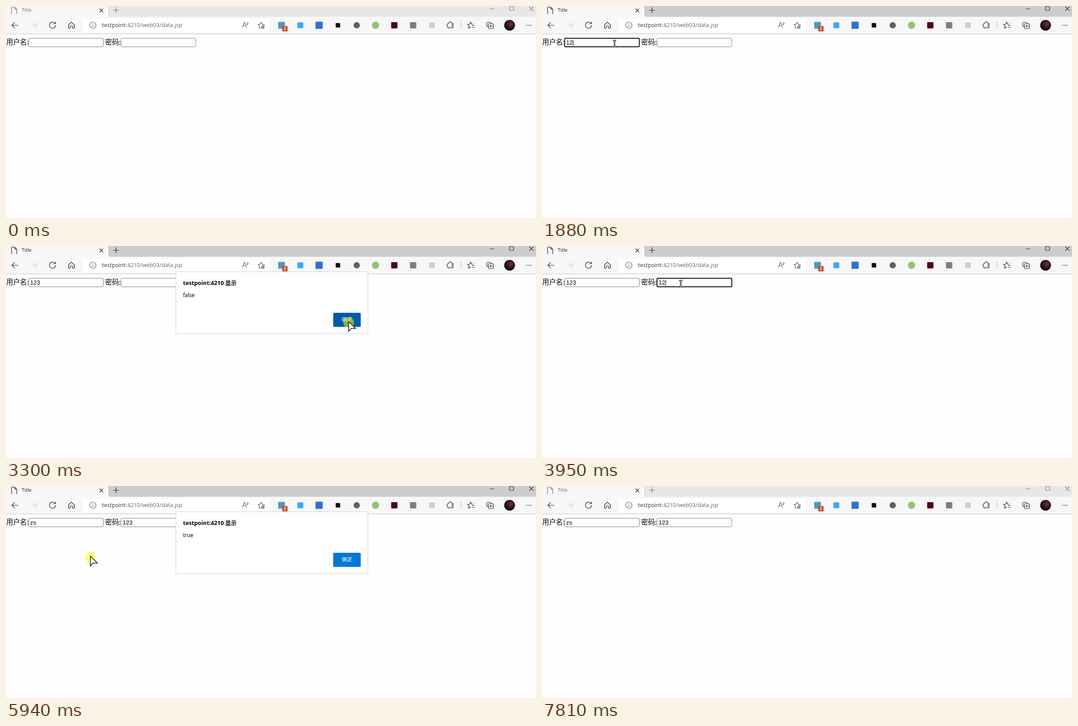
An HTML page that plays this animation: 1184x473 px, repeating every 7.88 s.

```html
<!DOCTYPE html>
<html lang="zh">
<head>
<meta charset="utf-8">
<title>Login form</title>
<style>
html, body { margin: 0; width: 100%; height: 100%; overflow: hidden; background: #fefefe; }
svg { display: block; }
text { font-family: "Noto Sans", "Noto Sans CJK SC", sans-serif; }
.cjk { font: 15.4px "Noto Sans CJK SC", sans-serif; }
.field { font: 13.33px "Liberation Sans", sans-serif; }
.line { fill: none; stroke: currentColor; stroke-width: 1.2; }
</style>
</head>
<body>
<svg width="1184" height="473" viewBox="0 0 1184 473">
  <rect width="1184" height="473" fill="#fefefe"/>
  <rect id="bar" width="1184" height="24"/>
  <path d="M0 0H229V20q0 4 4 4H0z" fill="#f7f7f7"/>
  <path d="M229.5 0V20q0 4 4 4" fill="none" stroke="#bbb" stroke-width=".7"/>
  <g id="title">
    <path class="line" d="M14.5 16.5H12.5V2.5H19.5L24 7V16.5H22M19.5 2.5V7H24"/>
    <text x="35" y="13" font-size="11" fill="currentColor">Title</text>
    <path class="line" d="M239 9.5H252M245.5 3V16"/>
    <path class="line" stroke-width="1" d="M1081 6.5H1091M1126 1.5h7q1 0 1 1v6q0 1-1 1h-7q-1 0-1-1v-6q0-1 1-1zM1169 1.5l9 9m0-9l-9 9"/>
  </g>
  <path class="line" color="#222" d="M209 6l8 8m0-8l-8 8"/>

  <rect y="24" width="1184" height="38" fill="#f7f7f7"/>
  <path d="M0 62.5H1184" stroke="#c4c4c4"/>
  <rect x="172" y="28" width="417" height="30" rx="4" fill="#fff"/>
  <g class="line" color="#222">
    <path d="M27.5 43H13.5M19.5 36.5L13 43l6.500 6.500"/>
    <path color="#ccc" stroke="#ccc" d="M54.500 43H68.500M62.500 36.500L69 43l-6.500 6.500"/>
    <path d="M109.500 38.500A7 7 0 1 0 111 43M110.500 35V39.500H106"/>
    <path d="M139.500 42L146 36l6.500 6V49.500H148.500V45q0-1-1-1h-3q-1 0-1 1V49.500H139.500z"/>
    <g stroke="#666">
      <circle cx="194" cy="43" r="7"/>
      <path d="M194 42V47M194 39V40.500"/>
      <path d="M528 48L532.500 36.500L537 48M529.500 44H535.500M537 38q2 2 0 4M539 36q3.500 3.500 0 7"/>
      <path d="M570 36l2.200 4.600 5 .7-3.600 3.500.9 5-4.500-2.300-4.500 2.300.9-5-3.600-3.500 5-.7z"/>
    </g>
    <circle cx="574" cy="47" r="4" fill="#555" stroke="#fff"/>
    <path stroke="#fff" d="M572 47H576M574 45V49"/>
    <path d="M988 38h3q-1-3 2-3t2 3h3q1 0 1 1v2.500q-3-1-3 1.500t3 1.500V48q0 1-1 1h-3q0-2-2-2t-2 2h-3q-1 0-1-1v-3q-2 0-2-2t2-2v-2q0-1 1-1z"/>
    <path d="M1044 40.500h-4l-2-4.500-2 4.500-5 .6 3.600 3.400-1 5 4.400-2.400M1041 43.500H1047M1041 47.500H1047"/>
    <path d="M1077 45.500h-1q-2 0-2-2v-5q0-2 2-2h6q2 0 2 2"/>
    <rect x="1077.500" y="39.500" width="11" height="10.500" rx="2"/>
    <path d="M1083 42V47.500M1080.200 44.800H1085.800"/>
    <path stroke="#bbb" d="M1016.500 35V50"/>
  </g>
  <path d="M1163.500 43h.1M1168.500 43h.1M1173.500 43h.1" stroke="#222" stroke-width="2.200" stroke-linecap="round"/>
  <text x="214.500" y="47" font-size="12.500" fill="#444">testpoint<tspan fill="#707070">:4210/web03/data.jsp</tspan></text>

  <g id="tools"></g>
  <rect x="617" y="44.500" width="12" height="12" rx="2" fill="#c8472b"/>
  <text x="623" y="54.300" font-size="10" text-anchor="middle" fill="#fff">8</text>
  <radialGradient id="photo" cx=".6" cy=".4" r=".5">
    <stop stop-color="#7d2c2c"/><stop offset="1" stop-color="#120e12"/>
  </radialGradient>
  <circle cx="1125" cy="43" r="12" fill="url(#photo)"/>

  <text class="cjk" x="0.500" y="86">用户名:</text>
  <text class="cjk" x="221.500" y="86">密码:</text>
  <g id="fields"></g>

  <g id="dialog">
    <rect x="379.500" y="57.500" width="429" height="138" fill="#fff" stroke="#cfcfcf"/>
    <text x="395.500" y="87" font-size="12.700" font-weight="700">testpoint:4210 显示</text>
    <text id="answer" x="395.500" y="114" font-size="11.700"></text>
    <rect id="ok" x="731" y="149" width="61.500" height="31.500" rx="2"/>
    <text x="761.700" y="168.300" font-size="11.700" font-weight="500" text-anchor="middle" fill="#fff">确定</text>
  </g>

  <g id="pointer">
    <circle id="press" cx=".5" cy="3" r="12" fill="#ff0" fill-opacity=".5"/>
    <path id="arrow" d="M.5 .5V22.500L6 16H16z" fill="#fff" stroke="#111" stroke-width="1.500"/>
    <g id="beam" fill="none">
      <path d="M-3.500-7H3.500M0-7V7M-3.500 7H3.500" stroke="#222" stroke-width="3.200"/>
      <path d="M-2.500-7H2.500M0-7V7M-2.500 7H2.500" stroke="#ddd" stroke-width="1"/>
    </g>
  </g>
</svg>
<script>
const LOOP = 7880;
const $ = id => document.getElementById(id);

function add(parent, tag, attrs) {
  const node = document.createElementNS("http://www.w3.org/2000/svg", tag);
  for (const key in attrs) node.setAttribute(key, attrs[key]);
  return parent.appendChild(node);
}

// Toolbar buttons: size, colour, round
[[15, "#4f97bd"], [13, "#3fa7f0"], [16, "#2b72cf"], [10, "#111"], [14, "#526473", 1],
 [16, "#94c074", 1], [14, "#4d0d12"], [14, "#7b7e7b"], [13, "#cfcfcf"]].forEach(([size, fill, round], i) =>
  add($("tools"), "rect", { x: 615.5 + i * 42 - size / 2, y: 43 - size / 2,
    width: size, height: size, rx: round ? size / 2 : 1, fill }));

const fields = [50.5, 257].map(x => ({
  x,
  box: add($("fields"), "rect", { x, y: 72, width: 167, height: 19, rx: 2, fill: "#fff" }),
  text: add($("fields"), "text", { class: "field", x: x + 3.5, y: 86 }),
  caret: add($("fields"), "path", { stroke: "#000" })
}));

// Time, x, y
const path = [
  [30, 1082, 458], [400, 560, 230], [770, 162, 84], [2070, 162, 84], [2380, 342, 97],
  [2720, 342, 97], [2850, 306, 112], [3200, 765, 168], [3370, 765, 168], [3490, 408, 150],
  [3700, 310, 84], [4080, 310, 84], [4200, 241, 152], [4350, 241, 152], [4590, 148, 91],
  [4650, 132, 83], [5670, 132, 83], [5850, 188, 156], [6040, 188, 156], [6250, 430, 190],
  [6440, 650, 182], [6650, 762, 168], [6900, 762, 168], [7240, 848, 251], [7390, 1112, 466]
];
const presses = [[1250, 1340], [2380, 2470], [3270, 3370], [3700, 3790],
  [4170, 4240], [4640, 4680], [5870, 6040], [6760, 6870]];
const focusSpans = [[[1250, 2400], [4650, 5890]], [[3710, 4190]]];
const typing = [
  [[0, ""], [1600, "1"], [1780, "12"], [1940, "123"], [4870, "12"], [4970, "1"], [5070, ""], [5350, "z"], [5500, "zs"]],
  [[0, ""], [3850, "1"], [3940, "12"], [4030, "123"]]
];
const alerts = [[2440, 3370], [5910, 6870]];

const within = (t, spans) => spans.some(([from, to]) => t >= from && t < to);
const latest = (t, steps) => steps.filter(step => step[0] <= t).pop()[1];
const show = (node, on) => node.setAttribute("visibility", on ? "inherit" : "hidden");

function position(t) {
  const i = path.findIndex(point => point[0] > t);
  if (i < 0) return path[path.length - 1].slice(1);
  if (i === 0) return path[0].slice(1);
  const [t0, x0, y0] = path[i - 1], [t1, x1, y1] = path[i];
  const p = (t - t0) / (t1 - t0), e = p + p * (1 - p) * (p - .5);
  return [x0 + (x1 - x0) * e, y0 + (y1 - y0) * e];
}

function draw(t) {
  const [x, y] = position(t);
  const active = t >= 1250 && t < 7810;
  const alerting = within(t, alerts);
  const pressed = within(t, presses);
  let overField = false;

  $("bar").setAttribute("fill", active ? "#cdcdcd" : "#e7e7e7");
  $("title").setAttribute("color", active ? "#222" : "#777");

  fields.forEach((field, i) => {
    const hover = !alerting && t >= 30 && x > field.x && x < field.x + 167 && y > 72 && y < 91;
    const focus = within(t, focusSpans[i]);
    overField = overField || hover;
    field.box.setAttribute("stroke", focus ? "#101010" : hover ? "#333" : "#767676");
    field.box.setAttribute("stroke-width", focus ? 2 : 1);
    field.text.textContent = latest(t, typing[i]);
    const end = Math.round(field.x + 4 + field.text.getComputedTextLength()) + .5;
    field.caret.setAttribute("d", `M${end} 75V89`);
    show(field.caret, focus);
  });

  show($("dialog"), alerting);
  $("answer").textContent = t < 5000 ? "false" : "true";
  const overOk = x > 731 && x < 792 && y > 149 && y < 180;
  $("ok").setAttribute("fill", overOk ? pressed ? "#005ca8" : "#006cc1" : "#0078d7");

  show($("pointer"), t >= 30 && t < 7390);
  $("pointer").setAttribute("transform", `translate(${x} ${y})`);
  show($("press"), pressed);
  show($("arrow"), !overField);
  show($("beam"), overField);
}

const start = performance.now();
function tick() {
  draw((performance.now() - start) % LOOP);
  requestAnimationFrame(tick);
}
tick();
</script>
</body>
</html>
```
